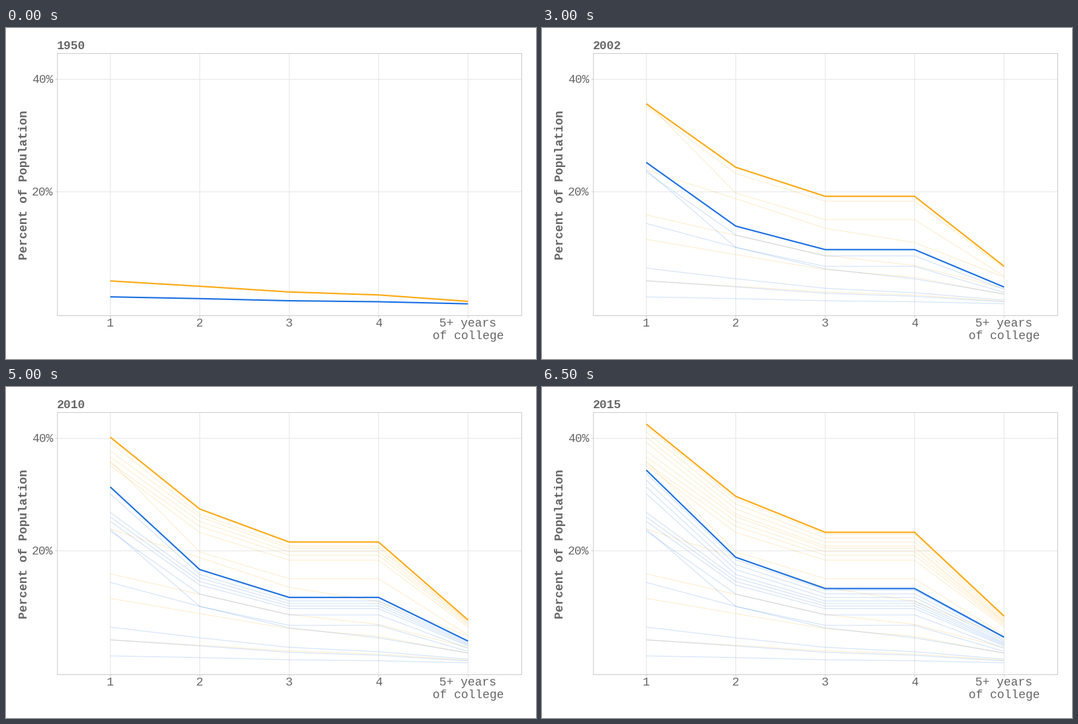
Recreate the animation shown at these times as a matplotlib script. Size 800 by 500 pixels, loop 7 s.

```python
import numpy as np
import matplotlib.pyplot as plt
from matplotlib.animation import FuncAnimation

W, H, DPI = 800, 500, 100
PX = 72 / DPI
LEFT, RIGHT, TOP, BOTTOM = 77, 778, 38, 434
X_ONE, X_STEP = 157.4, 135
Y_ZERO, Y_UNIT = 417.9, 8.525
GREY, ORANGE, BLUE = "#666666", "#fea80f", "#196fe3"

YEARS = [*range(1950, 2000, 10), *range(2000, 2015, 2), 2015]
COLLEGE = range(1, 6)

# Percent with one and two years of college, at the years where the trend bends.
BENDS = [1950, 1960, 1970, 1980, 1990, 2000, 2002, 2006, 2008, 2015]
# Share of each further year relative to the year before it, by era.
ERAS = [1950, 1980, 1990, 2000, 2015]

UPPER = dict(
    first=[4.2, 11.57, 15.92, 23.84, 35.93, 35.11, 35.58, 37.7, 39.2, 42.44],
    second=[3.26, 8.87, 12.28, 18.79, 19.79, 23.25, 24.35, 26, 26.5, 29.65],
    shares=[[0.69, 0.72, 0.761, 0.789, 0.785],
            [0.765, 0.813, 1, 1, 1],
            [0.34, 0.444, 0.336, 0.353, 0.362]],
)
LOWER = dict(
    first=[1.38, 4.24, 6.47, 14.39, 23.84, 23.49, 25.2, 26.8, 30.1, 34.3],
    second=[1.07, 3.15, 4.59, 10.16, 10.14, 12.34, 13.92, 15.2, 15.8, 18.85],
    shares=[[0.645, 0.625, 0.669, 0.7, 0.706],
            [0.75, 0.72, 1, 1, 1],
            [0.285, 0.417, 0.32, 0.315, 0.353]],
)


def profile(group, year):
    """Percent for one to five years of college in the given year."""
    pcts = [np.interp(year, BENDS, group[key]) for key in ("first", "second")]
    for share in group["shares"]:
        pcts.append(pcts[-1] * np.interp(year, ERAS, share))
    return pcts


plt.rcParams["font.family"] = "Liberation Mono"
fig = plt.figure(figsize=(W / DPI, H / DPI), dpi=DPI, facecolor="white")
ax = fig.add_axes([LEFT / W, 1 - BOTTOM / H, (RIGHT - LEFT) / W, (BOTTOM - TOP) / H])
ax.set_xlim(1 + (LEFT - X_ONE) / X_STEP, 1 + (RIGHT - X_ONE) / X_STEP)
ax.set_ylim((Y_ZERO - BOTTOM) / Y_UNIT, (Y_ZERO - TOP) / Y_UNIT)
ax.set_xticks(COLLEGE, [])
ax.set_yticks([20, 40], [])
ax.tick_params(length=3 * PX, width=PX, color="#cccccc")
ax.grid(color="#e6e6e6", lw=PX)
ax.set_axisbelow(True)
for spine in ax.spines.values():
    spine.set(color="#cccccc", linewidth=PX)


def label(x, y, text, **style):
    return fig.text(x / W, 1 - y / H, text, color=GREY, fontsize=18 * PX, **style)


title = label(77, 32, "", weight="bold")
label(32.5, 237.5, "Percent of Population", weight="bold", rotation=90,
      rotation_mode="anchor", ha="center", va="baseline")
for pct in (20, 40):
    label(71.5, Y_ZERO - pct * Y_UNIT + 6, f"{pct}%", ha="right")
for n in range(1, 5):
    label(X_ONE + (n - 1) * X_STEP, 451, str(n), ha="center")
label(697.5, 451, "5+ years", ha="center")
label(697.5, 470, "of college", ha="center")


def make_lines(group, color):
    return [ax.plot(COLLEGE, profile(group, year), color=color,
                    solid_capstyle="butt")[0] for year in YEARS]


groups = [make_lines(UPPER, ORANGE), make_lines(LOWER, BLUE)]


def draw(i):
    title.set_text(str(YEARS[i]))
    for lines in groups:
        for k, line in enumerate(lines):
            now = k == i
            line.set(visible=k <= i, alpha=1 if now else 0.2,
                     linewidth=(2.1 if now else 1.1) * PX, zorder=4 if now else 3)
    return [title, *groups[0], *groups[1]]


anim = FuncAnimation(fig, draw, frames=len(YEARS), interval=500,
                     repeat=True, repeat_delay=0, blit=False)
plt.show()
```
